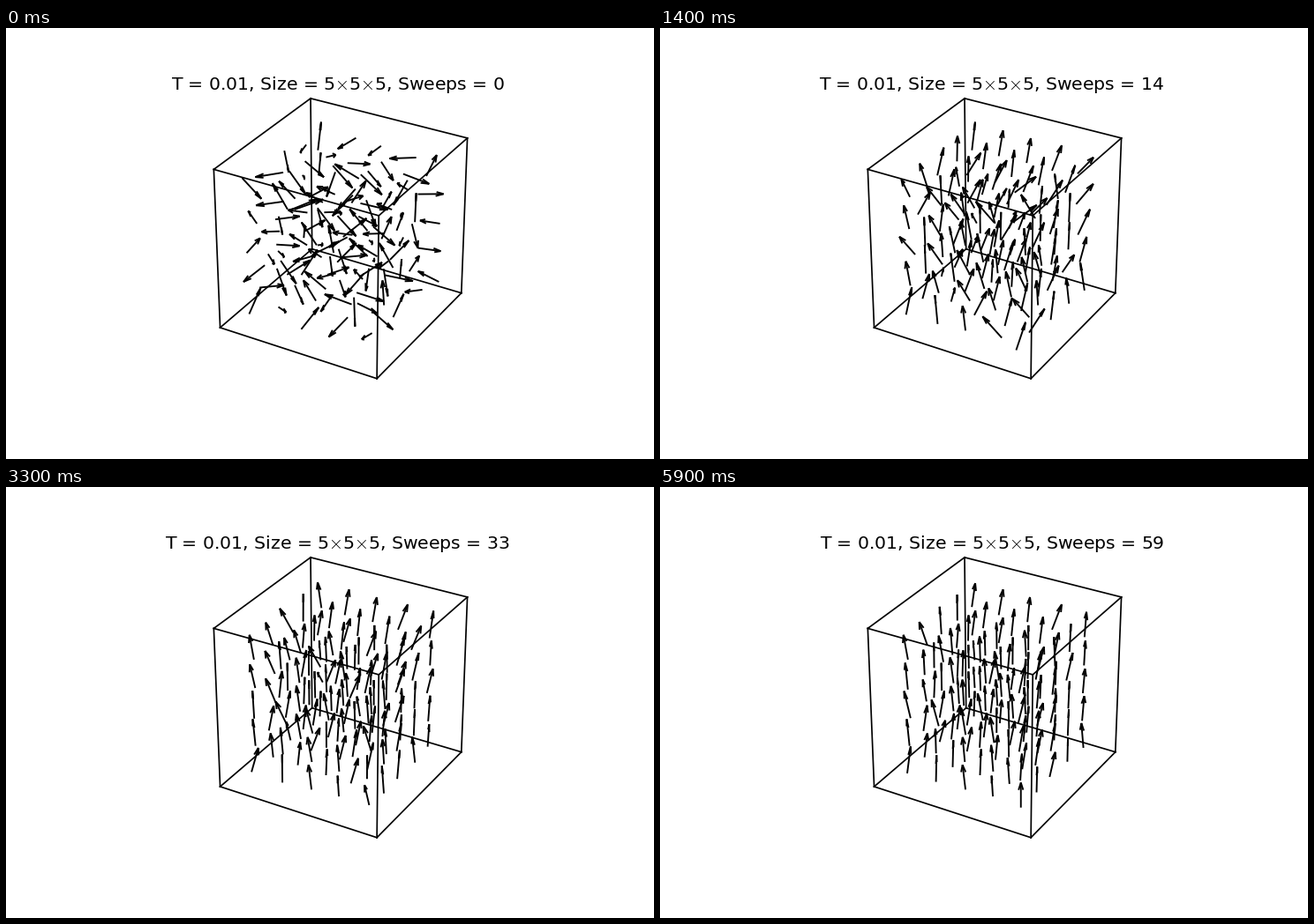
A matplotlib script that plays this animation: 734 by 489 pixels, repeating every 6 s.

```python
import itertools

import matplotlib.pyplot as plt
import numpy as np
from matplotlib.animation import FuncAnimation
from matplotlib.collections import LineCollection

W, H, DPI = 734, 489, 128
PT = 72 / DPI                      # points per pixel
N, FRAMES, STEP_MS = 5, 60, 100
LOW, SPAN = -0.8, 5.6              # data limits of the cube
TEMP, COUPLING, FIELD = 0.01, 1.0, 1.5
TRIAL_WIDTH = 0.7                  # spread of a trial turn
LENGTH, HEAD_RATIO, HEAD_ANGLE = 0.9, 0.3, np.radians(15)
ORIGIN, SCALE, DIST = (381.3, 233.4), 2049.7, 10

plt.rcParams["font.family"] = "DejaVu Sans"
plt.rcParams["mathtext.fontset"] = "cm"

# Camera axes for elevation 30, azimuth -60
elev, azim = np.radians([30, -60])
RIGHT = np.array([-np.sin(azim), np.cos(azim), 0])
TOWARD = np.array([np.cos(elev) * np.cos(azim), np.cos(elev) * np.sin(azim), np.sin(elev)])
UP = np.cross(TOWARD, RIGHT)

SITES = np.array(list(itertools.product(range(N), repeat=3)))


def project(points):
    """Perspective view of data points, in pixels from the top left."""
    rel = (points - LOW) / SPAN - 0.5
    scale = SCALE / (DIST - rel @ TOWARD)
    return np.stack([ORIGIN[0] + rel @ RIGHT * scale,
                     ORIGIN[1] - rel @ UP * scale], axis=-1)


def unit(v):
    return v / np.linalg.norm(v, axis=-1, keepdims=True)


def relax(padded, rng):
    """One Metropolis sweep over randomly picked sites, open boundaries."""
    for i, j, k in SITES[rng.integers(len(SITES), size=len(SITES))] + 1:
        spin = padded[i, j, k]
        trial = unit(spin + TRIAL_WIDTH * rng.normal(size=3))
        pull = COUPLING * (padded[i - 1, j, k] + padded[i + 1, j, k]
                           + padded[i, j - 1, k] + padded[i, j + 1, k]
                           + padded[i, j, k - 1] + padded[i, j, k + 1])
        pull[2] += FIELD
        cost = (spin - trial) @ pull
        if cost <= 0 or rng.random() < np.exp(-cost / TEMP):
            padded[i, j, k] = trial


def simulate():
    rng = np.random.default_rng(11)
    padded = np.zeros((N + 2, N + 2, N + 2, 3))
    inner = padded[1:-1, 1:-1, 1:-1]
    inner[:] = unit(rng.normal(size=inner.shape))
    states = [inner.reshape(-1, 3).copy()]
    for _ in range(1, FRAMES):
        relax(padded, rng)
        states.append(inner.reshape(-1, 3).copy())
    return states


def arrows(d):
    """Shafts centred on the sites, each with two head strokes."""
    tail, tip = SITES - d * LENGTH / 2, SITES + d * LENGTH / 2
    axis = unit(np.stack([d[:, 1], -d[:, 0], 0 * d[:, 0]], axis=1))
    side = np.cross(axis, d)
    lines = [(tail, tip)]
    for angle in (HEAD_ANGLE, -HEAD_ANGLE):
        barb = d * np.cos(angle) + side * np.sin(angle)
        lines.append((tip - barb * LENGTH * HEAD_RATIO, tip))
    return np.concatenate([np.stack([project(a), project(b)], axis=1)
                           for a, b in lines])


def cube_edges():
    corners = np.array(list(itertools.product((0, 1), repeat=3)))
    return [project(LOW + SPAN * np.array([a, b]))
            for a, b in itertools.combinations(corners, 2)
            if np.abs(a - b).sum() == 1]


states = simulate()

fig = plt.figure(figsize=(W / DPI, H / DPI), dpi=DPI, facecolor="white")
ax = fig.add_axes([0, 0, 1, 1])
ax.set_xlim(0, W)
ax.set_ylim(H, 0)
ax.axis("off")

ax.add_collection(LineCollection(cube_edges(), colors="black",
                                 linewidths=1.7 * PT, capstyle="projecting"))
spin_lines = ax.add_collection(LineCollection([], colors="black",
                                              linewidths=1.9 * PT))
title = ax.text(375.8, 70, "", ha="center", va="baseline", fontsize=20.39 * PT)


def draw(sweep):
    spin_lines.set_segments(arrows(states[sweep]))
    title.set_text(rf"T = 0.01, Size = 5$\times$5$\times$5, Sweeps = {sweep}")
    return spin_lines, title


anim = FuncAnimation(fig, draw, frames=FRAMES, interval=STEP_MS,
                     repeat=True, repeat_delay=0, blit=False)
plt.show()
```
